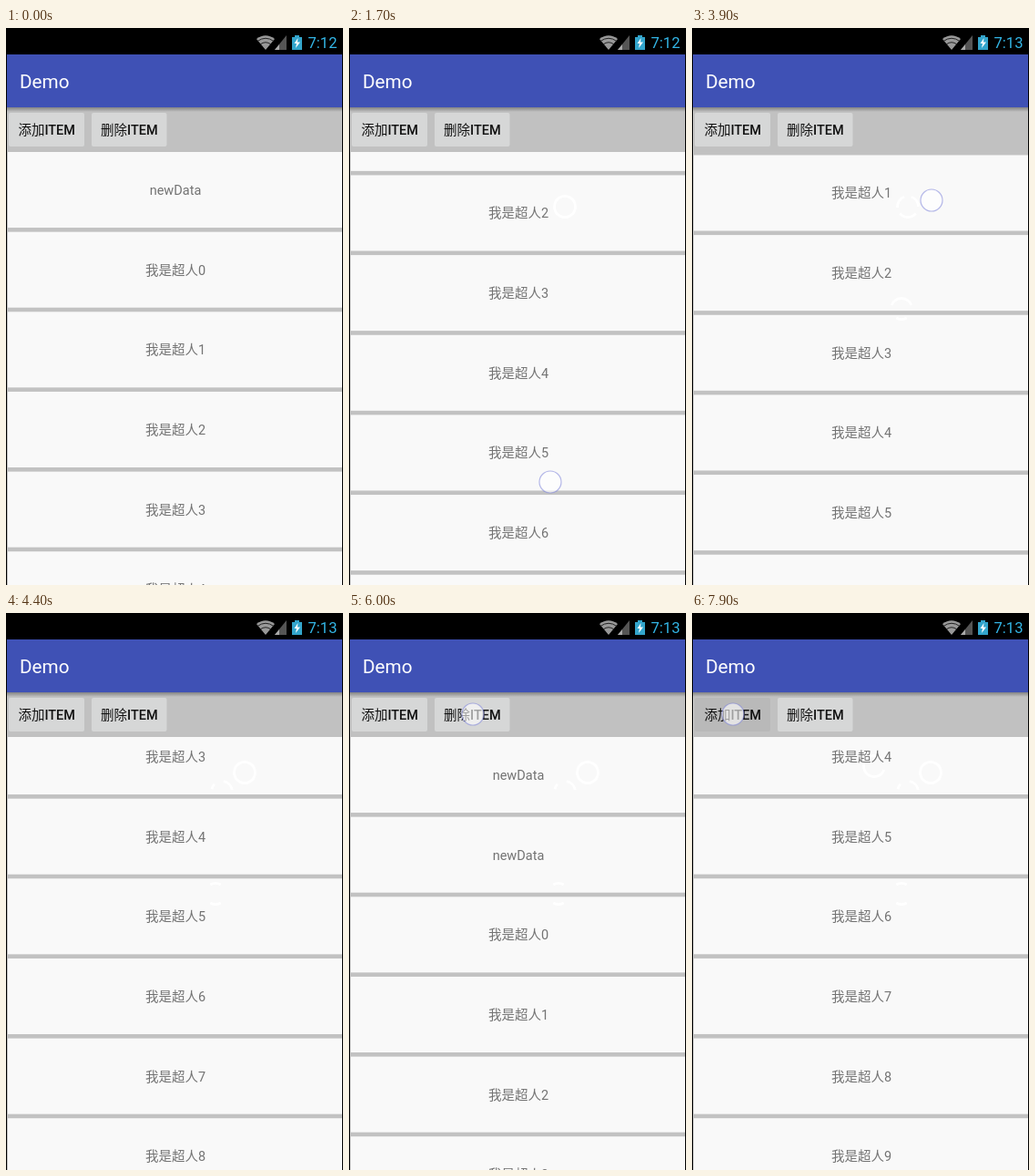
An HTML page for the animation above (8 s loop, 370 px wide and 611 px high).

```html
<!DOCTYPE html>
<html lang="zh">
<head>
<meta charset="utf-8">
<style>
  html, body { margin: 0; width: 100%; height: 100%; overflow: hidden; background: #000; }
  svg { display: block; width: 370px; height: 611px; }
  text { font: 14.5px Roboto, "Noto Sans CJK SC", "Noto Sans CJK", sans-serif; }
  #rows text { fill: #737373; text-anchor: middle; }
  #header text { font-weight: 500; text-anchor: middle; fill: #111; }
  #rings path { fill: none; stroke: #fff; stroke-width: 2.8; }
</style>
</head>
<body>
<svg viewBox="0 0 370 611">
  <defs>
    <linearGradient id="shade" x2="0" y2="1">
      <stop stop-color="#000" stop-opacity=".32"/>
      <stop offset="1" stop-color="#000" stop-opacity="0"/>
    </linearGradient>
  </defs>
  <rect width="370" height="611"/>
  <rect x="1" y="87" width="368" height="524" fill="#c2c2c2"/>
  <rect x="2" y="136" width="367" height="475" fill="#f9f9f9"/>
  <g id="rings"></g>
  <g id="rows"></g>

  <g id="header">
    <rect x="1" y="87" width="368" height="49" fill="#c1c1c1"/>
    <rect x="1" y="87" width="368" height="5" fill="url(#shade)"/>
    <rect id="add" x="3" y="93" width="83" height="37" rx="2"/>
    <rect id="del" x="94" y="93" width="82.5" height="37" rx="2"/>
    <text x="44.7" y="117">添加ITEM</text>
    <text x="135.4" y="117">删除ITEM</text>
  </g>
  <rect x="1" y="29" width="368" height="58" fill="#3f51b5"/>
  <text x="15" y="65.5" fill="#fff" style="font-size:20.7px">Demo</text>

  <rect width="370" height="29"/>
  <path d="M285 24 275 12Q285 4.500 295 12Z" fill="#999"/>
  <path d="M276 14.500Q285 8 294 14.500M279 18Q285 13.500 291 18" fill="none" stroke="#222" stroke-width="1"/>
  <path d="M295 24H308V8Z" fill="#555"/>
  <path d="M295 24H300V18Z" fill="#aaa"/>
  <path d="M314 10H317V8H322V10H325V24H314Z" fill="#33a5cc"/>
  <path d="M320.500 11 316.500 17H319L318 22 323 15.500H320Z" fill="#fff"/>
  <text id="clock" x="331.500" y="22" fill="#33b5e5" style="font-size:16.6px"></text>

  <circle id="touch" r="12" fill="#fff" fill-opacity=".6" stroke="#7a80d8" stroke-opacity=".55" stroke-width="1.2"/>
</svg>
<script>
const LOOP = 8000, STEP = 100, PITCH = 87.65, GAP = 4.6, FIRST_Y = 178;
const $ = id => document.getElementById(id);
const clamp = p => Math.min(1, Math.max(0, p));
const smooth = p => p * p * (3 - 2 * p);

// Each drag scrolls from `base` by `dist`; `fling` is the distance coasted afterwards.
const drags = [
  { show: 600, start: 700, end: 1400, hide: 1500, from: [225, 434], to: [237, 196], base: 0, dist: 237.5 },
  { show: 1600, start: 1700, end: 2200, hide: 2300, from: [221, 498], to: [230, 308], base: 237.5, dist: 187.5 },
  { show: 3600, start: 3700, end: 3900, hide: 4000, from: [255, 449], to: [263, 189], base: 0, dist: 259.5, fling: 265 },
  { show: 7000, start: 7100, end: 7500, hide: 7600, from: [173, 445], to: [200, 168], base: 0, dist: 283 }
];

// Button presses: time, button, finger x, time held
const taps = [
  [2700, "add", 50, 200], [5200, "add", 48, 200], [7900, "add", 45, 200],
  ...[5900, 6100, 6300, 6500].map(t => [t, "del", 136, 100])
];

// Number of "newData" rows ahead of row 0
const leads = [[0, 1], [2900, 2], [5400, 3], [6000, 2], [6200, 1], [6400, 0], [6600, -1]];
const resets = [2900, 5400];

// Rings left by the finger: x, y, then [time, arc from, arc to, ...] in degrees
const rings = [
  [237, 196, [1500, 0, 359.9], [1900, 170, 370, 30, 150], [3800, 175, 250, 290, 360, 40, 140], [4300, 195, 225, 280, 350]],
  [230, 308, [2300, 0, 359.9], [3800, 200, 340, 60, 120], [4300, 240, 300, 60, 120]],
  [262, 175, [4000, 0, 359.9]],
  [200, 168, [7600, 20, 320]]
];

const svgNode = (tag, parent, attrs = {}) => {
  const node = document.createElementNS("http://www.w3.org/2000/svg", tag);
  for (const key in attrs) node.setAttribute(key, attrs[key]);
  return parent.appendChild(node);
};
const rows = Array.from({ length: 7 }, () => {
  const group = svgNode("g", $("rows"));
  svgNode("rect", group, { x: 2, y: -42 - GAP, width: 367, height: GAP, fill: "#c2c2c2" });
  return { group, label: svgNode("text", group, { x: 186, y: 5 }) };
});
const ringPaths = rings.map(() => svgNode("path", $("rings")));

const latest = (list, t) => list.filter(entry => entry[0] <= t).pop();
const progress = (d, t) => {
  const p = clamp((t - d.start) / (d.end - d.start));
  return d.fling ? p : smooth(p);
};

function scrollAt(t) {
  const drag = drags.filter(d => d.show <= t).pop();
  if (!drag || resets.some(r => r > drag.show && r <= t)) return 0;
  const coast = 1 - clamp((t - drag.end) / 1000);
  return drag.base + drag.dist * progress(drag, t) + (drag.fling || 0) * (1 - coast * coast);
}

function fingerAt(t) {
  const tap = taps.find(([time, , , held]) => t >= time && t < time + held);
  if (tap) return [tap[2], 111];
  const drag = drags.find(d => t >= d.show && t < d.hide);
  if (drag) {
    const p = progress(drag, t);
    return drag.from.map((v, i) => v + (drag.to[i] - v) * p);
  }
  return t >= 5900 && t < 6700 ? [136, 111] : null;
}

function arcs(x, y, angles) {
  const point = a => `${x + 11.5 * Math.cos(a * Math.PI / 180)} ${y + 11.5 * Math.sin(a * Math.PI / 180)}`;
  let d = "";
  for (let i = 0; i < angles.length; i += 2) {
    const [a, b] = [angles[i], angles[i + 1]];
    d += `M${point(a)}A11.5 11.5 0 ${b - a > 180 ? 1 : 0} 1 ${point(b)}`;
  }
  return d;
}

function render(t) {
  const scroll = scrollAt(t), lead = latest(leads, t)[1];
  const top = Math.floor(scroll / PITCH);
  rows.forEach(({ group, label }, n) => {
    const i = top + n;
    group.setAttribute("transform", `translate(0 ${FIRST_Y + i * PITCH - scroll})`);
    label.textContent = i < lead ? "newData" : "我是超人" + (i - lead);
  });

  rings.forEach(([x, y, ...stages], i) => {
    const stage = latest(stages, t);
    ringPaths[i].setAttribute("d", stage ? arcs(x, y, stage.slice(1)) : "");
  });

  for (const id of ["add", "del"]) {
    const pressed = taps.some(([time, name, , held]) => name === id && t >= time && t < time + held);
    $(id).setAttribute("fill", pressed ? "#b9b9b9" : "#d6d7d7");
  }

  const finger = fingerAt(t);
  $("touch").setAttribute("visibility", finger ? "visible" : "hidden");
  if (finger) $("touch").setAttribute("transform", `translate(${finger})`);
  $("clock").textContent = t < 3000 ? "7:12" : "7:13";
}

const began = performance.now();
function tick() {
  const t = (performance.now() - began) % LOOP;
  render(Math.floor(t / STEP) * STEP);
  requestAnimationFrame(tick);
}
tick();
</script>
</body>
</html>
```
